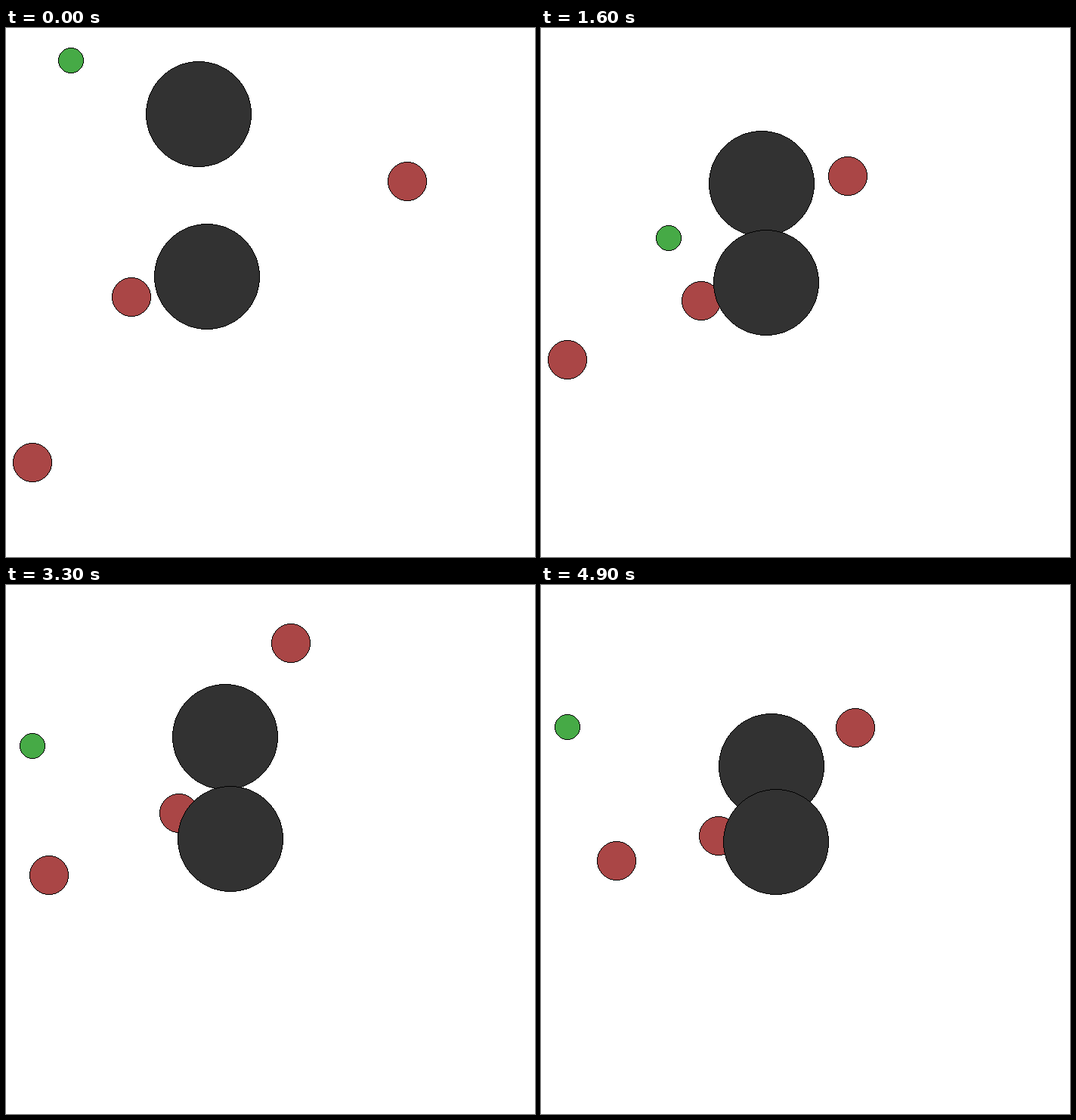
These frames come from a looping animation (700 px wide and 700 px high, 5000 ms). An HTML page with a canvas:

```html
<!DOCTYPE html>
<html lang="en">
<head>
<meta charset="utf-8">
<title>Chase</title>
<style>
  html, body { margin: 0; width: 100%; height: 100%; overflow: hidden; background: #fff; }
  canvas { display: block; }
</style>
</head>
<body>
<canvas id="stage" width="700" height="700"></canvas>
<script>
const ctx = document.getElementById('stage').getContext('2d');
const SIZE = 700, MID = SIZE / 2, REACH = MID * 0.9;
const LOOP = 5000, STEP = 100;
const RED = 'rgb(170,70,70)', GREEN = 'rgb(70,170,70)', DARK = 'rgb(50,50,50)';

// Each mover drifts through a few waypoints, measured from the stage centre.
const times = [0, 8, 16, 23, 30, 33, 44, 49];
const movers = [
  { r: 26, color: RED,
    x: [-315, -429, -515.2, -515.2, -475, -463, -541, -535],
    y: [225, 164, 146, 128, 68, 55, 106, 33] },
  { r: 26, color: RED,
    x: [-184, -206, -225, -230, -205, -191, -256, -246],
    y: [6, 6, 19, 14, -45, -75, -49, -38] },
  { r: 26, color: RED,
    x: [181, 142, 92, 74, 66, 44, 38, 143],
    y: [-147, -224, -251, -313, -441, -432, -368, -344] },
  { r: 17, color: GREEN,
    x: [-264, -298, -295, -397, -468, -499, -692, -676],
    y: [-307, -261, -117, -101, -178, -216, -368, -347] }
];
const rocks = [[-94.5, -235.5], [-83.45, -20.9]];

// Smooth curve through unevenly timed values.
function sample(values, t) {
  const last = times.length - 1;
  let i = 0;
  while (i < last - 1 && t >= times[i + 1]) i++;
  const gap = j => times[j + 1] - times[j];
  const rate = j => (values[j + 1] - values[j]) / gap(j);
  const slope = j => {
    if (j === 0) return rate(0);
    if (j === last) return rate(last - 1);
    const a = gap(j - 1), b = gap(j);
    return (rate(j - 1) * b + rate(j) * a) / (a + b);
  };
  const h = gap(i), u = (t - times[i]) / h, v = 1 - u;
  return values[i] * v * v * (1 + 2 * u) + values[i + 1] * u * u * (3 - 2 * u)
    + h * u * v * (slope(i) * v - slope(i + 1) * u);
}

// Hard-edged disc with a one-pixel black rim.
function disc([x, y], r, color, zoom) {
  const place = n => Math.floor(MID + n * zoom + 1e-6);
  const px = place(x), py = place(y);
  const edge = i => Math.round(Math.sqrt((r - 0.5) ** 2 - (i + 0.5) ** 2) - 0.5);
  const dot = (a, b) => {
    for (const dx of [a, -1 - a])
      for (const dy of [b, -1 - b]) ctx.fillRect(px + dx, py + dy, 1, 1);
  };
  ctx.fillStyle = color;
  for (let i = 0; i < r - 1; i++) {
    const half = edge(i) + 1;
    ctx.fillRect(px - half, py + i, 2 * half, 1);
    ctx.fillRect(px - half, py - 1 - i, 2 * half, 1);
  }
  ctx.fillStyle = '#000';
  for (let i = 0; i <= edge(i); i++) {
    dot(i, edge(i));
    dot(edge(i), i);
  }
}

function draw(ms) {
  const t = Math.floor((ms % LOOP) / STEP);
  const spots = movers.map(m => [sample(m.x, t), sample(m.y, t)]);
  // The camera zooms so that the farthest coordinate stays in view.
  const zoom = REACH / Math.max(...[...spots, ...rocks].flat().map(Math.abs));
  ctx.fillStyle = '#fff';
  ctx.fillRect(0, 0, SIZE, SIZE);
  movers.forEach((m, i) => disc(spots[i], m.r, m.color, zoom));
  rocks.forEach(p => disc(p, 70, DARK, zoom));
}

const start = performance.now();
function tick() {
  draw(performance.now() - start);
  requestAnimationFrame(tick);
}
tick();
</script>
</body>
</html>
```
